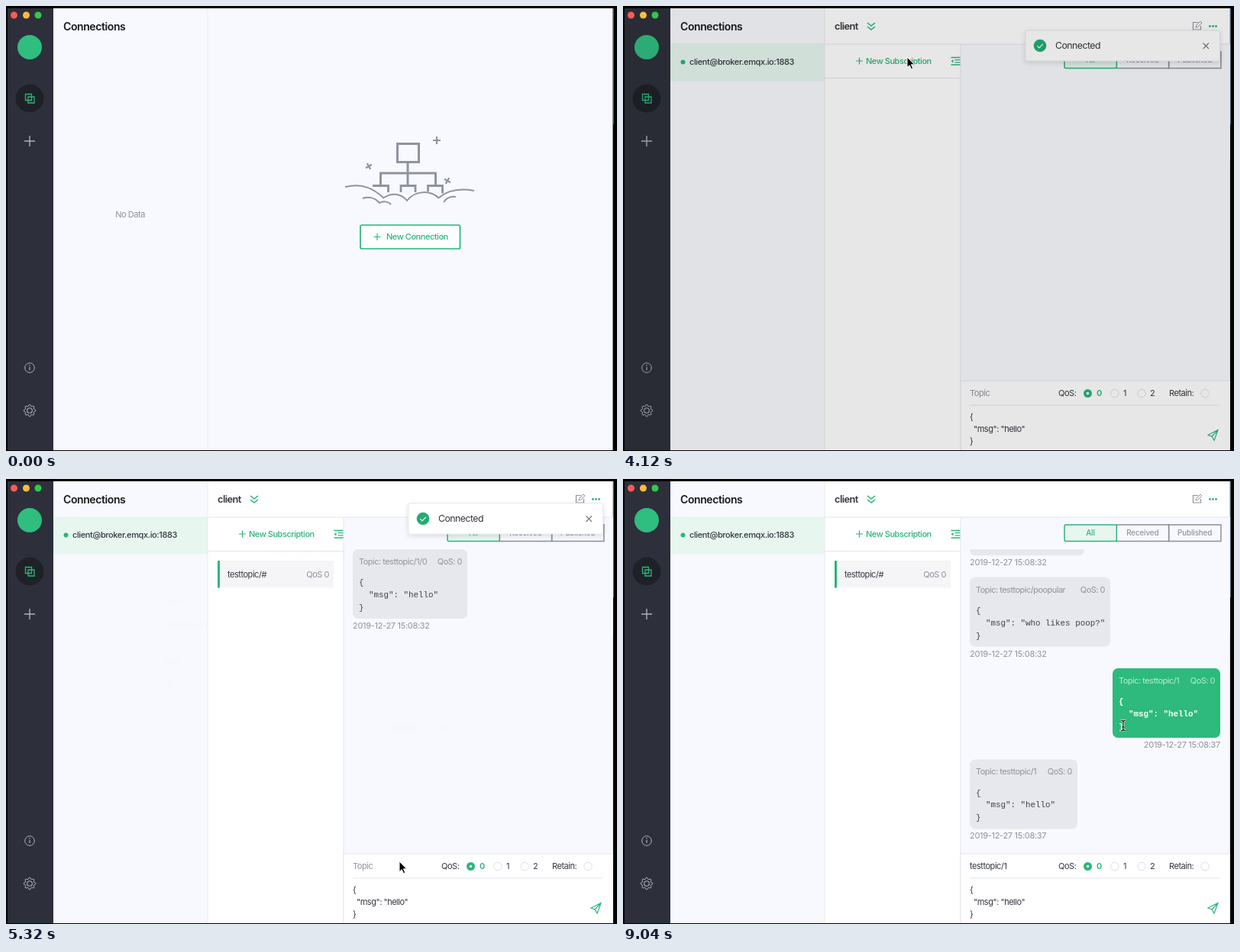
Write an HTML page that moves like this. It is 800 px wide and 583 px high and loops after 9080 ms.

```html
<!DOCTYPE html>
<html lang="en">
<head>
<meta charset="utf-8">
<title>Connection walkthrough</title>
<style>
html, body { margin: 0; width: 100%; height: 100%; overflow: hidden; background: #000; }
svg { display: block; width: 800px; height: 583px; }
text { font-family: Inter, "Open Sans", sans-serif; letter-spacing: -.042em; white-space: pre; }
.mono { font-family: "Liberation Mono", "DejaVu Sans Mono", monospace; letter-spacing: 0; }
</style>
</head>
<body>
<svg id="stage" viewBox="0 0 800 583"></svg>
<script>
const LOOP = 9080, STEP = 40;
const GREEN = '#2ab57a', INK = '#34373f', GREY = '#8e929b', LINE = '#e4e6ee', PAGE = '#f8f9fe', TINT = '#e7f6ef';

// Drawing helpers; text is centred vertically on y
const text = (x, y, s, o = {}) => {
  const size = o.size || 11;
  return `<text x="${x}" y="${y + size * .36}" font-size="${size}" fill="${o.fill || INK}"
    font-weight="${o.weight || 400}" text-anchor="${o.anchor || 'start'}"
    ${o.id ? `id="${o.id}"` : ''} ${o.mono ? 'class="mono"' : ''}
    ${o.ls ? `style="letter-spacing:${o.ls}em"` : ''}>${s}</text>`;
};
const rect = (x, y, w, h, fill, stroke = 'none', r = 0, sw = 1) =>
  `<rect x="${x}" y="${y}" width="${w}" height="${h}" rx="${r}" fill="${fill}" stroke="${stroke}" stroke-width="${sw}"/>`;
const dot = (x, y, r, fill, stroke = 'none', sw = 1) =>
  `<circle cx="${x}" cy="${y}" r="${r}" fill="${fill}" stroke="${stroke}" stroke-width="${sw}"/>`;
const path = (d, stroke, sw = 1, fill = 'none') =>
  `<path d="${d}" fill="${fill}" stroke="${stroke}" stroke-width="${sw}"/>`;
const group = (id, body, extra = '') => `<g id="${id}" ${extra}>${body}</g>`;
const plus = (x, y, r, color, sw) => path(`M${x - r} ${y}h${2 * r}M${x} ${y - r}v${2 * r}`, color, sw);
const input = (x, y, w, value = '', on = false, id) =>
  rect(x + .5, y - 10.5, w - 1, 21, '#fff', on ? GREEN : LINE, 2) +
  text(x + 12, y, value, { size: 9.6, id });
const radio = (x, y, on) => on ? dot(x, y, 5.5, GREEN) + dot(x, y, 1.8, '#fff') : dot(x, y, 5.2, '#fff', '#dcdee6');
const label = (x, y, s, need, anchor = 'end') =>
  text(x, y, (need ? '<tspan fill="#e05260">* </tspan>' : '') + s, { anchor });
const choice = (x, y, s, on) => radio(x, y, on) + text(x + 13, y, s, on ? { fill: GREEN, weight: 500 } : {});
const caret = (x, y) => path(`M${x - 4} ${y - 2}l4 4 4-4`, '#b4b8c2');
const refresh = (x, y, color) =>
  path(`M${x + 3.2} ${y - 2}A3.8 3.8 0 1 0 ${x + 3.8} ${y + .8}M${x + 4} ${y - 4.5}v3h-3`, color, 1.2);

const clientId = 'panel_8e24b6d0';

function sidebar() {
  const teeth = Array.from({ length: 32 }, (_, i) => {
    const r = i % 4 < 2 ? 7.7 : 6, a = (i - .5) * Math.PI / 16;
    return (31 + r * Math.cos(a)).toFixed(1) + ' ' + (530 + r * Math.sin(a)).toFixed(1);
  }).join('L');
  const icon = '#aeb1b9';
  return rect(2, 3, 60, 580, '#2d303b') + dot(31, 54, 16, '#30bd80') +
    dot(31, 121, 18.5, '#1f2129') +
    path('M25.5 115.5h8v8h-8zM29 119h8v8h-8z', GREEN, 1.3) +
    plus(31, 177, 7, icon, 1.4) + dot(31, 474, 6.3, 'none', icon) +
    path('M31 473v4M31 470v1.4', icon, 1.2) +
    path(`M${teeth}Z`, icon, 1) + dot(31, 530, 3.3, 'none', icon, 1.1);
}

const lights = dot(10.5, 12, 4.5, '#fc5b57') + dot(26.5, 12, 4.5, '#fdbc40') + dot(42, 12, 4.5, '#34c84a');

function emptyPage() {
  const c = '#8f949d';
  return path('M512.5 180.5h28v24h-28zM526 205v14M490.5 236v-17h72v17M526 219v17', c, 3) +
    path('M480 235.5h20.5v8.5M517 244v-8.5h19v8.5M552.5 243v-7.5h19v10', c, 2.8) +
    path('M444 237C466 232 480 238 495 252M495 251C506 244 518 246 525 255C536 241 556 241 567 252M567 251C580 240 596 239 613 242M467 252C476 249 484 252 489 258C494 255 500 256 504 260M573 257C577 251 583 249 589 250', c, 2) +
    plus(564, 176, 5, c, 2.2) +
    `<g transform="rotate(60 475 210)">${plus(475, 210, 4.5, c, 2.2)}</g>` +
    `<g transform="rotate(30 578 229)">${plus(578, 229, 4.5, c, 2.2)}</g>` +
    rect(464, 287, 130.5, 31, '#fff', GREEN, 2, 1.7) + plus(486, 302.5, 4.5, GREEN, 1.2) +
    text(498, 302.5, 'New Connection', { fill: GREEN, weight: 500 });
}

function formPage() {
  const rows = [['Name', '', 1], ['Client ID', clientId, 1], ['IP Address', 'broker.emqx.io', 1],
    ['Port', '1883', 1], ['Username', ''], ['Password', '']];
  return rect(264, 3, 531, 46, '#fff') + rect(264, 49, 531, 1, LINE) +
    path('M283.5 22.5l-4 4 4 4', GREEN, 1.4) + text(287, 26.5, 'Back', { fill: GREEN, weight: 500 }) +
    text(526, 26.5, 'New', { anchor: 'middle', size: 12.5, weight: 600 }) +
    text(782, 26.5, 'Connect', { anchor: 'end', fill: GREEN, weight: 500 }) +
    text(277, 73.5, 'General', { fill: GREY, weight: 600 }) +
    rect(277, 90, 504.5, 254, '#fff', LINE, 2) +
    rows.map(([s, v, need], i) => label(356, 114 + 34 * i, s, need) +
      input(365, 115.5 + 34 * i, 360, v, false, i ? '' : 'name')).join('') +
    `<rect id="focus" x="365.5" y="105" width="359" height="21" rx="2" fill="none" stroke="${GREEN}"/>` +
    refresh(739, 149, INK) + label(356, 318, 'SSL/TLS') +
    choice(371, 319.5, 'true') + choice(432, 319.5, 'false', true) +
    text(277, 376, 'Advanced', { fill: GREY, weight: 600 }) + path('M331 378.5l4-4.5 4 4.5z', 'none', 0, GREY) +
    rect(277, 392, 504.5, 185, '#fff', LINE, 2) +
    label(408, 416, 'Connect Timeout (ms)') + input(417, 418, 308, '4000') +
    label(408, 450, 'Keep Alive (s)') + input(417, 452, 308, '60') +
    label(408, 484, 'Clean Session') + choice(422.5, 485.5, 'true', true) + choice(484, 485.5, 'false') +
    label(408, 517.5, 'Auto Reconnect') + choice(422.5, 519, 'true', true) + choice(484, 519, 'false') +
    label(408, 551, 'MQTT Version') + input(417, 552.5, 308, '3.1.1') + caret(712, 552.5);
}

function clientPanel() {
  return rect(264, 3, 531, 200, '#fff') +
    label(277, 57.5, 'Name', 1, 'start') + input(277, 84, 158, 'client') +
    label(450, 57.5, 'Client ID', 1, 'start') + input(450, 84, 158.5, clientId, true) + refresh(600, 84, GREEN) +
    label(624, 57.5, 'Username', 0, 'start') + input(624, 84, 158) +
    label(277, 115.5, 'Password', 0, 'start') + input(277, 142, 158) +
    label(450, 115.5, 'Keep Alive', 0, 'start') + input(450, 142, 158.5, '60') +
    rect(624, 136, 11, 11, GREEN, 'none', 1) + path('M626.5 141.5l2.3 2.3 4-4.3', '#fff', 1.2) +
    text(642, 141.5, 'Clean Session', { fill: GREEN, weight: 500 }) +
    rect(692.5, 169.5, 89, 21.5, '#fff', '#86615d', 2, 1.4) +
    path('M707 177.5a3.5 3.5 0 1 0 5 0M709.5 175.5v4', '#86615d') +
    text(720, 180, 'Disconnect', { fill: '#86615d' });
}

function panelHead() {
  return text(277, 26.5, 'client', { size: 12.8, weight: 600 }) +
    group('fold', path('M-5 4.5l5-4 5 4M-5-.5l5-4 5 4', GREEN, 1.6)) +
    path('M753 21.5h-6.5v9.5h10v-5', GREY, 1.2) + path('M750 28l.6-2.6 5.4-5.4 2 2-5.4 5.4z', GREY) +
    [768.5, 772.5, 776.5].map(x => dot(x, 26.5, 1.4, GREEN)).join('');
}

const bubble = (i, [topic, w, stamp, body = 'hello', sent]) => {
  const x = sent ? 782 - w : 454, y = 92 + 119.4 * i;
  const head = { fill: sent ? '#b9efd5' : GREY, size: 10.9 };
  const code = { fill: sent ? '#fff' : '#3d414b', size: 10.85, mono: true, weight: sent ? 700 : 400 };
  return group('msg' + i, rect(x, y, w, 91, sent ? '#2dba7c' : '#e6e8ed', 'none', 7) +
    text(x + 8, y + 16, 'Topic: testtopic/' + topic, head) +
    text(x + w - 7, y + 16, 'QoS: 0', { ...head, anchor: 'end' }) +
    text(x + 8, y + 43.5, '{', code) + text(x + 21, y + 59, `"msg": "${body}"`, code) +
    text(x + 8, y + 76, '}', code) +
    text(sent ? 782 : 454, y + 100, '2019-12-27 15:08:' + stamp,
      { fill: GREY, anchor: sent ? 'end' : 'start', ls: -.028 }));
};
const messages = [['1/0', 150, 32], ['1', 141, 32], ['1000', 160, 32], ['1/3', 150, 32],
  ['poopular', 184, 32, 'who likes poop?'], ['1', 141, 37, 'hello', true], ['1', 141, 37]];
const arrivals = [5280, 5360, 5360, 5360, 5360, 8440, 8560];

function lowerPanel() {
  const tabs = ['All', 'Received', 'Published'].map((s, i) => {
    const color = i ? GREY : GREEN;
    return rect(578 + 68.3 * i, 60, 68.3, 21.5, i ? PAGE : TINT, i ? '#8b8f97' : GREEN, i ? 0 : 2, 1.5) +
      text(612 + 68.3 * i, 70.5, s, { anchor: 'middle', size: 9.8, fill: color, weight: 500, ls: -.01 });
  }).reverse().join('');
  return rect(264, 49.5, 531, 700, '#fff') + rect(442, 50, 353, 700, PAGE) +
    rect(264, 49.5, 531, 1, LINE) + rect(264, 94, 178, 1, LINE) + rect(441.5, 50, 1, 700, LINE) +
    plus(309.5, 72, 4.5, GREEN, 1.2) + text(318, 72.5, 'New Subscription', { fill: GREEN, weight: 500 }) +
    path('M429.5 67.5h12M434.5 70.7h7M434.5 73.8h7M429.5 77h12', GREEN, 1.3) +
    path('M432.5 70l-3 2.2 3 2.2z', 'none', 0, GREEN) +
    group('sub', rect(277, 107, 152, 35.5, '#f5f5f7') + rect(277, 107, 3, 35.5, GREEN) +
      '<rect id="select" x="290" y="118" width="51" height="14" fill="#a9c9ee"/>' +
      text(290, 125, 'testtopic/#') + text(423, 125, 'QoS 0', { fill: GREY, anchor: 'end' }) +
      group('remove', dot(428, 108.5, 6.7, '#e34d59') + path('M425.5 106l5 5M430.5 106l-5 5', '#fff', 1.2))) +
    `<g clip-path="url(#feed)">${group('list', messages.map((m, i) => bubble(i, m)).join(''))}</g>` + tabs;
}

function editor() {
  const qos = [0, 1, 2].map(n => radio(608.5 + 35.3 * n, 507.5, !n) +
    text(620 + 35 * n, 507.5, n, { fill: n ? INK : GREEN, weight: n ? 400 : 600 })).join('');
  return rect(442, 491, 353, 92, '#fff') + rect(442, 490.5, 353, 1, LINE) + rect(441.5, 490, 1, 93, LINE) +
    text(454, 507.5, 'Topic', { id: 'topic' }) + text(570, 507.5, 'QoS:') + qos +
    text(715, 507.5, 'Retain:') + radio(762, 507.5) + rect(454, 522.5, 327, 1, LINE) +
    text(454, 538, '{') + text(459, 554.5, '"msg": "hello"') + text(454, 570.5, '}') +
    path('M766 562l13-6.5-5 13.5-3-5zM771 564l8-8.5', GREEN, 1.2);
}

const toast = () => rect(527, 32, 254.5, 40, '#fff', '#e6e8ee', 2) +
  dot(546, 52, 8.3, '#24ad72') + path('M542.3 52.2l2.7 2.7 4.8-5', '#fff', 1.2) +
  text(566, 52, 'Connected', { size: 12.3 }) + path('M759.5 48.5l7.5 7.5M767 48.5l-7.5 7.5', '#74777f', 1.1);

const modal = () => rect(181, 88, 433.5, 273, '#fff', 'none', 2) + rect(181, 131, 433.5, 1, LINE) +
  text(397, 109, 'New Subscription', { anchor: 'middle', size: 12.3 }) +
  label(199, 172.5, 'Topic', 1, 'start') + rect(199.5, 188, 396, 30, '#fff', '#dcdde2', 2) + text(211, 203, 'testtopic/#') +
  label(199, 251.5, 'QoS', 1, 'start') + rect(199.5, 267, 396, 30, '#fff', '#dcdde2', 2) + text(211, 282.5, '0') +
  caret(582, 282) + text(535.5, 338, 'Cancel', { anchor: 'end' }) +
  text(595, 338, 'Confirm', { anchor: 'end', fill: GREEN, weight: 500 });

const stage = document.getElementById('stage');
const beamPath = 'M-3.5-7q3 0 3.5 2q.5-2 3.5-2M-3.5 7q3 0 3.5-2q.5 2 3.5 2M0-5v10M-2 2h4';
stage.innerHTML = `<defs>
  <clipPath id="win"><rect x="2" y="3" width="792.5" height="579"/></clipPath>
  <clipPath id="feed"><rect x="442" y="92" width="353" height="399"/></clipPath>
  <filter id="shadow" x="-10%" y="-20%" width="120%" height="150%"><feDropShadow dx="0" dy="2" stdDeviation="3" flood-opacity=".13"/></filter>
  </defs>` + rect(0, 0, 800, 583, '#000') +
  `<g clip-path="url(#win)">` + rect(2, 3, 793, 580, PAGE) + sidebar() +
  text(75, 26.5, 'Connections', { size: 14, weight: 600, fill: '#18191d', ls: -.029 }) +
  group('none', text(162.5, 273, 'No Data', { anchor: 'middle', fill: GREY })) +
  group('item', rect(62, 49, 202, 49.5, TINT) + dot(78.5, 73.5, 3, GREEN) +
    text(87, 73.5, 'client@broker.emqx.io:1883', { weight: 500, ls: -.034 })) +
  group('empty', emptyPage()) + group('form', formPage()) +
  group('client', clientPanel() + group('lower', lowerPanel()) + panelHead() + editor()) +
  rect(263.5, 3, 1, 580, '#e9eaf1') +
  group('toast', toast(), 'filter="url(#shadow)"') +
  group('shade', rect(2, 3, 793, 580, '#000')) + group('modal', modal()) + lights +
  group('arrow', path('M0 0v13.5l3.2-2.8 2.3 5 2.2-1-2.3-4.9h4.2z', '#fff', 1, '#000')) +
  group('beam', path(beamPath, '#fff', 2.6) + path(beamPath, '#111', 1.2)) +
  '</g>' + rect(795, 3, 1, 152, '#47586b');

const el = {};
stage.querySelectorAll('[id]').forEach(n => { el[n.id] = n; });
const show = (id, on) => el[id].setAttribute('visibility', on ? 'inherit' : 'hidden');
const fade = (id, v) => el[id].setAttribute('opacity', v);
const move = (id, x, y, extra = '') => el[id].setAttribute('transform', `translate(${x} ${y}) ${extra}`);

// CSS "ease" curve
function ease(x) {
  if (x <= 0) return 0;
  if (x >= 1) return 1;
  let lo = 0, hi = 1, s = .5;
  for (let i = 0; i < 18; i++) {
    s = (lo + hi) / 2;
    const u = 1 - s;
    if (.75 * u * u * s + .75 * u * s * s + s ** 3 < x) lo = s; else hi = s;
  }
  const u = 1 - s;
  return .3 * u * u * s + 3 * u * s * s + s ** 3;
}
const ramp = (t, from, ms) => ease((t - from) / ms);
const inside = (t, a, b) => t >= a && t < b;

// Pointer stops: time, x, y
const stops = [[200, 620, 590], [600, 527, 304], [800, 527, 304], [1120, 450, 114], [2120, 450, 114],
  [2560, 764, 28], [2960, 764, 28], [3240, 766, 39], [3400, 766, 39], [3880, 372, 67],
  [4320, 372, 67], [4760, 575, 340], [5040, 575, 340], [5320, 515, 501],
  [5800, 515, 501], [6240, 319, 121], [6920, 319, 121], [7240, 485, 506], [7960, 485, 506],
  [8240, 771, 560], [8480, 771, 560], [8880, 655, 323], [9080, 655, 323]];
function pointer(t) {
  const i = stops.findIndex(s => s[0] > t);
  if (i < 1) return [620, 620];
  const [a, ax, ay] = stops[i - 1], [b, bx, by] = stops[i];
  const k = (1 - Math.cos(Math.PI * (t - a) / (b - a))) / 2;
  return [ax + (bx - ax) * k, ay + (by - ay) * k];
}

function draw(t) {
  const formAt = 760, focusAt = 1200, openAt = 2920;
  show('empty', t < formAt);
  show('form', inside(t, formAt, openAt));
  show('none', t < openAt);
  show('item', t >= openAt);
  show('client', t >= openAt);

  show('focus', inside(t, focusAt, openAt));
  const typed = 'client'.slice(0, Math.max(0, Math.floor((t - 1400) / 100)));
  el.name.textContent = typed + (inside(t, focusAt, 2560) ? '|' : '');

  // The details fold away by themselves soon after connecting
  const folded = ramp(t, 3600, 240);
  move('lower', 0, 150 * (1 - folded));
  move('fold', 325, 26.5, t >= 3600 ? 'scale(1 -1)' : '');

  show('sub', t >= 5140);
  show('select', inside(t, 6400, 7280));
  show('remove', inside(t, 6160, 7000));
  arrivals.forEach((at, i) => show('msg' + i, t >= at));
  move('list', 0, -202.2 * ramp(t, 5400, 160) - 119.4 * (ramp(t, 8440, 120) + ramp(t, 8560, 120)));

  const topic = t < 7400 ? '' : t < 7600 ? 'testtopic/#' : t < 7760 ? 'testtopic/' : 'testtopic/1';
  el.topic.textContent = topic || 'Topic';
  el.topic.setAttribute('fill', topic ? INK : GREY);

  show('toast', inside(t, 3280, 6480));
  move('toast', 255 * (1 - ramp(t, 3296, 200)), 0);
  fade('toast', 1 - ramp(t, 6260, 200));

  const opened = ramp(t, 4140, 200) - ramp(t, 5154, 200);
  fade('shade', .5 * (ramp(t, 4100, 133) - ramp(t, 5154, 133)));
  fade('modal', opened);
  move('modal', 0, 3 - 15.6 * (1 - opened));

  const [x, y] = pointer(t);
  const beam = inside(t, 1080, 1480) || inside(t, 6200, 6960) || inside(t, 7200, 7400) || t >= 8800;
  const hidden = t < 200 || inside(t, 1480, 2120) || inside(t, 7400, 7960);
  show('beam', beam && !hidden);
  show('arrow', !beam && !hidden);
  move('beam', x, y);
  move('arrow', x, y);
}

const start = performance.now();
function tick() {
  const t = (performance.now() - start) % LOOP;
  draw(Math.floor(t / STEP) * STEP);
  requestAnimationFrame(tick);
}
tick();
</script>
</body>
</html>
```
